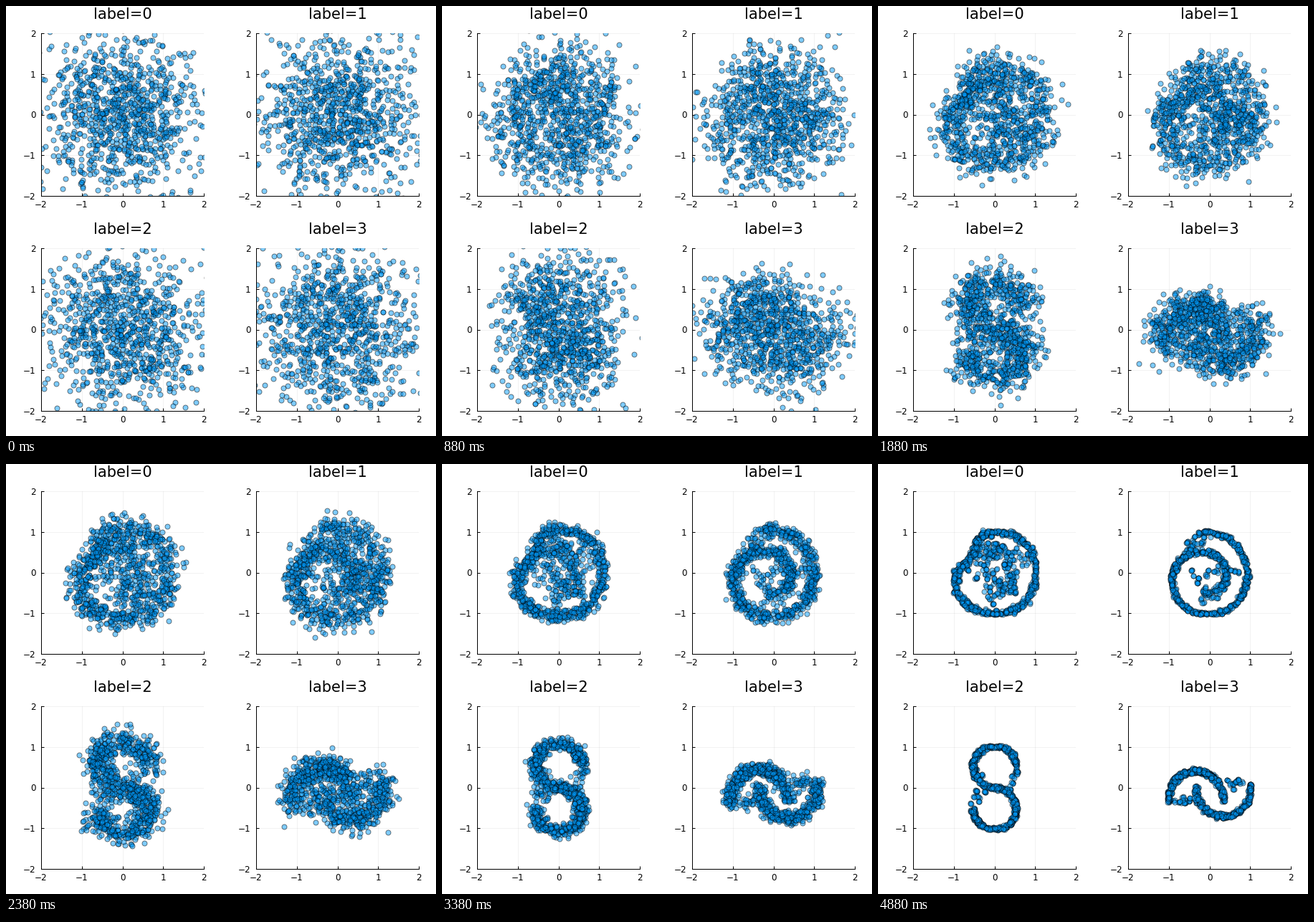
A matplotlib script that plays this animation: 600x600 px, repeating every 6.26 s.

```python
import numpy as np
import matplotlib.pyplot as plt
from matplotlib.animation import FuncAnimation

SIZE, DPI = 600, 100
PX = 72 / DPI                      # points per pixel
LOOP_MS, FRAMES, STEPS = 6260, 50, 39
POINTS, CENTERS = 1000, 800
LEFT, TOP, SIDE, PITCH = 49, 38, 227, 300

# Reverse diffusion: the noise decays exponentially, the scale eases to one
time = np.linspace(0, 1, STEPS + 1)
SIGMA = .012 + .988 * (np.exp(-2.8 * time) - np.exp(-2.8)) / (1 - np.exp(-2.8))
SCALE = 1 + .18 * (1 - time)
CHURN = .25

rng = np.random.default_rng(7)


def jitter(points, spread):
    return points + rng.normal(size=points.shape) * spread


def bridge(start, end, n, spread):
    """Stray points between two places."""
    u = rng.random((n, 1))
    return jitter(np.array(start) * (1 - u) + np.array(end) * u, spread)


def roll(u):
    t = 1.5 * np.pi * (1 + 2 * u)
    return np.c_[(t * np.cos(t) - 1.55) / 12, (t * np.sin(t) - 1.5) / 12.3]


def swiss_roll():
    u = rng.random(CENTERS - 54)
    spread = .02 + .08 * np.exp(-10 * u)
    return np.vstack([jitter(roll(u), spread[:, None]),
                      bridge((-.1, .95), (-.5, .45), 36, .08),
                      bridge((-.6, -.1), (.1, .1), 9, .15),
                      bridge((.1, .1), (.7, 0), 9, .06)])


def s_curve():
    t = 3 * np.pi * (rng.random(CENTERS - 23) - .5)
    curve = np.c_[.52 * np.sin(t), .515 * np.sign(t) * (np.cos(t) - 1)]
    return np.vstack([jitter(curve, .02),
                      bridge((.52, .4), (.42, 0), 14, .04),
                      bridge((-.5, -.4), (-.4, 0), 6, .04),
                      bridge((-.25, .3), (-.3, -.2), 3, .05)])


def moons():
    t = np.pi * rng.random(CENTERS - 35)
    arc = np.c_[np.cos(t), np.sin(t)]
    arc[::2] = [1, .5] - arc[::2]
    return np.vstack([jitter(arc * [.68, .73] - [.34, .33], .022),
                      bridge((-.9, -.3), (-.35, -.35), 12, .06),
                      bridge((-.4, -.15), (-.38, -.35), 14, .07),
                      bridge((.35, .1), (.85, .1), 9, .05)])


def blend():
    angle = 2 * np.pi * rng.random(560)
    radius = 1.02 - .37 * np.exp(-((angle - 2.56) / .5) ** 2)
    outline = np.c_[radius * np.cos(angle), radius * np.sin(angle)]
    return np.vstack([jitter(outline, .035),
                      jitter(roll(.38 * rng.random(130)), .11),
                      bridge((-.35, .1), (.2, -.3), 30, .15),
                      bridge((-.25, .75), (-.45, .3), 40, .08),
                      bridge((-.1, .75), (.75, .2), 40, .13)])


def denoise(x, centers, width):
    d2 = (x ** 2).sum(1)[:, None] - 2 * x @ centers.T + (centers ** 2).sum(1)
    w = np.exp((d2.min(1, keepdims=True) - d2) / (2 * width ** 2))
    return w @ centers / w.sum(1, keepdims=True)


def sample(centers):
    """Path of the cloud from plain noise to the shape."""
    centers = np.clip(centers, -1, 1)
    x = rng.normal(size=(POINTS, 2))
    path = [x]
    for k in range(STEPS):
        clean = denoise(x / SCALE[k], centers, max(.5 * SIGMA[k], .015))
        noise = (x - SCALE[k] * clean) / SIGMA[k]
        noise = jitter(np.sqrt(1 - CHURN ** 2) * noise, .85 * CHURN)
        x = SCALE[k + 1] * clean + SIGMA[k + 1] * noise
        path.append(x)
    return path


def add_panel(label):
    left = LEFT + PITCH * (label % 2)
    top = TOP + PITCH * (label // 2)
    ax = fig.add_axes([left / SIZE, 1 - (top + SIDE) / SIZE, SIDE / SIZE, SIDE / SIZE])
    ax.set(xlim=(-2, 2), ylim=(-2, 2), xticks=range(-2, 3), yticks=range(-2, 3))
    ax.set_axisbelow(True)
    ax.grid(color="black", alpha=.1, linewidth=.5 * PX)
    ax.tick_params(direction="in", length=4 * PX, width=PX, labelsize=12 * PX)
    ax.tick_params(axis="x", pad=6 * PX)
    ax.tick_params(axis="y", pad=7.5 * PX)
    ax.spines[["top", "right"]].set_visible(False)
    ax.spines[["left", "bottom"]].set_linewidth(PX)
    fig.text((left + SIDE / 2) / SIZE, 1 - (top - 19.5) / SIZE, f"label={label}",
             fontsize=21 * PX, ha="center", va="baseline")
    cloud, = ax.plot([], [], "o", markersize=7 * PX, markeredgewidth=PX,
                     markerfacecolor=(0, .604, .98, .5), markeredgecolor=(0, 0, 0, .5))
    return cloud


plt.rcParams["font.family"] = "DejaVu Sans"
fig = plt.figure(figsize=(SIZE / DPI, SIZE / DPI), dpi=DPI, facecolor="white")
paths = [sample(shape()) for shape in (blend, swiss_roll, s_curve, moons)]
clouds = [add_panel(label) for label in range(4)]


def update(frame):
    step = min(frame, STEPS)
    for cloud, path in zip(clouds, paths):
        cloud.set_data(*path[step].T)
    return clouds


anim = FuncAnimation(fig, update, frames=FRAMES, interval=LOOP_MS / FRAMES,
                     repeat=True, repeat_delay=0)
plt.show()
```
